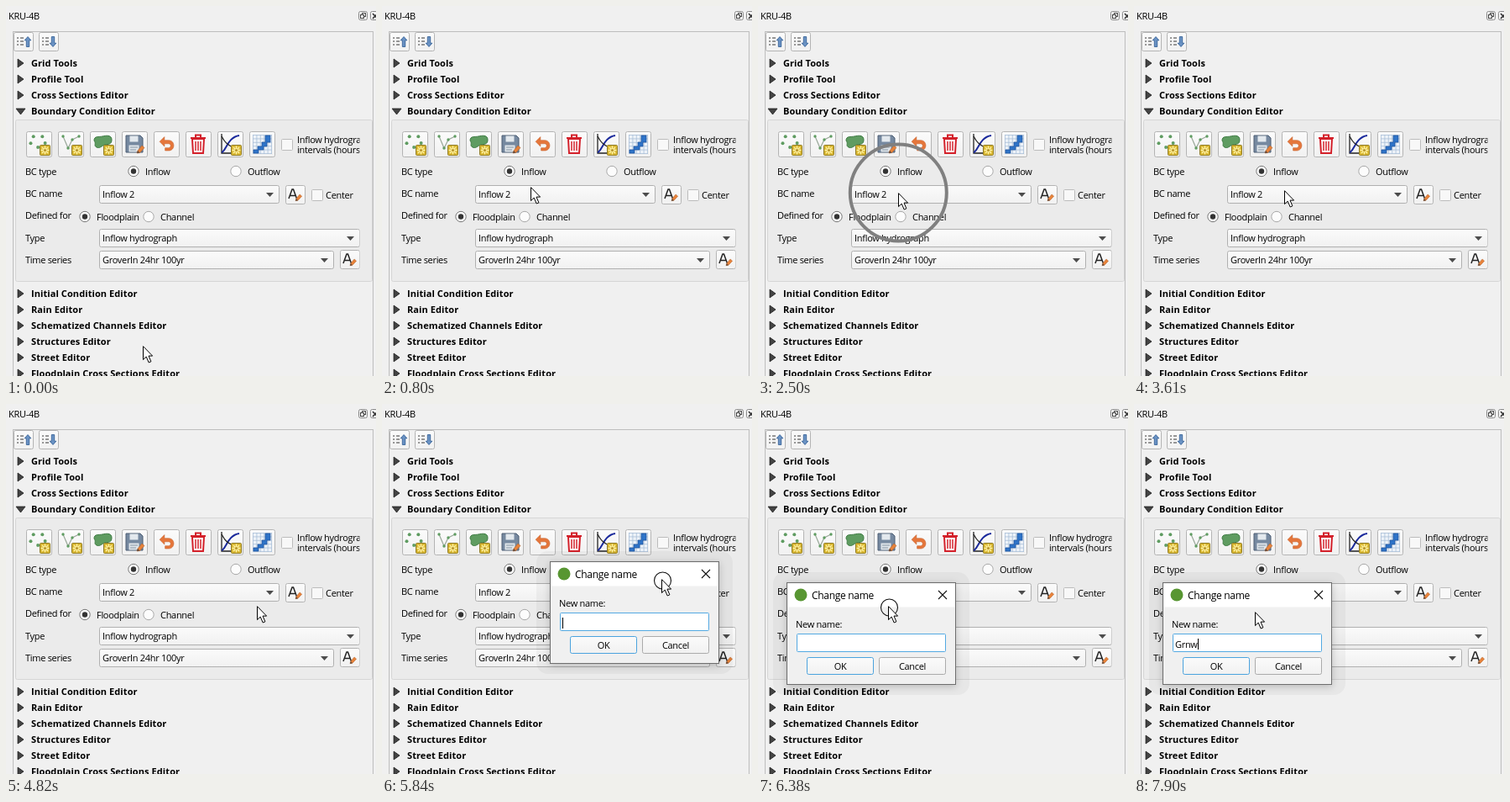
An HTML page for the animation above (8 s loop, 441 by 440 pixels).

```html
<!DOCTYPE html>
<html lang="en">
<head>
<meta charset="utf-8">
<title>Boundary condition editor</title>
<style>
html, body { margin: 0; width: 100%; height: 100%; overflow: hidden; background: #f0f0f0; }
svg { display: block; width: 100vw; height: 100vh; }
text { font: 11px "Open Sans", "Noto Sans", sans-serif; letter-spacing: -.3px; white-space: pre; }
.bold { font-weight: 700; letter-spacing: .08px; }
.title { font-size: 12px; }
.mid { text-anchor: middle; }
.frame { filter: drop-shadow(0 2px 4px rgba(0, 0, 0, .2)); }
</style>
</head>
<body>
<svg viewBox="0 0 441 440">
  <defs>
    <linearGradient id="face" x2="0" y2="1">
      <stop stop-color="#fbfbfb"/><stop offset="1" stop-color="#f1f1f1"/>
    </linearGradient>
    <clipPath id="view"><rect x="9" y="31" width="412.5" height="409"/></clipPath>
  </defs>
  <rect width="441" height="440" fill="#f0f0f0"/>
  <g id="panel"></g>
  <g id="form" clip-path="url(#view)"></g>
  <circle id="ring" cx="167.3" cy="222" fill="none" stroke="#808080" stroke-width="4"/>
  <g id="dialog"></g>
  <g id="pointer">
    <circle id="halo" cx="1.5" cy="2" r="10" fill="none" stroke="#111" stroke-width="1.1"/>
    <path d="M.5 .7V16.6L4.2 13.1 7.2 20 9.9 18.8 7 12.1H11.6Z" fill="#fff" stroke="#000"/>
  </g>
</svg>
<script>
const $ = id => document.getElementById(id);
const each = (n, draw) => Array.from({ length: n }, (_, i) => draw(i)).join('');

const text = (x, y, s, cls = '') => `<text x="${x}" y="${y}" class="${cls}">${s}</text>`;
const rect = (x, y, w, h, fill, stroke = 'none', r = 0) =>
  `<rect x="${x + .5}" y="${y + .5}" width="${w - 1}" height="${h - 1}" rx="${r}" fill="${fill}" stroke="${stroke}"/>`;
const path = (d, fill, stroke = 'none', w = 1) =>
  `<path d="${d}" fill="${fill}" stroke="${stroke}" stroke-width="${w}"/>`;
const line = (d, stroke, w = 1) => path(d, 'none', stroke, w);
const dot = (x, y, r, fill, stroke = 'none') =>
  `<circle cx="${x}" cy="${y}" r="${r}" fill="${fill}" stroke="${stroke}"/>`;
const group = (transform, body) => `<g transform="${transform}">${body}</g>`;
const at = (x, y, body) => group(`translate(${x} ${y})`, body);

// Form widgets, placed by the centre line of their row.
const label = (x, y, s) => text(x, y + 4, s);
const button = (x, y, w, h, body = '') => at(x, y, rect(0, 0, w, h, 'url(#face)', '#b4b4b4', 2) + body);
const checkbox = (x, y, s) => rect(x, y - 7, 14, 14, '#f8f8f8', '#bcbcbc', 1) + label(x + 17, y, s);
const radio = (x, y, s, on) => dot(x, y - .5, 6.2, '#fcfcfc', on ? '#777' : '#a8a8a8') +
  (on ? dot(x, y - .5, 3.2, '#333') : '') + label(x + 14, y, s);
const combo = (x, y, w, s) => rect(x, y - 11, w, 22, 'url(#face)', '#b0b0b0', 2) +
  path(`M${x + w - 16} ${y - 2}h9l-4.5 5z`, '#4c4c4c') + label(x + 4, y, s);
const pencil = (x, y) => at(x, y,
  path('M0 9L1 6 6 0 9 2.5 3.5 8.5Z', '#e8833a', '#b0602a', .6) + path('M0 9L1 6 3.5 8.5Z', '#5a4a40'));
const rename = (x, y) => button(x, y - 12, 24, 23,
  line('M4 16L8 5H9.5L13.5 16M6 12.5H11.500', '#222', 1.5) + group('translate(12 11) scale(.85)', pencil(0, 0)));

const section = (y, name, open) =>
  path(open ? `M12 ${y - 3}h11l-5.500 7z` : `M14 ${y - 5}v10l7 -5z`, '#444', '#111', .7) +
  label(30, y, name).replace('class=""', 'class="bold"');

const badge = rect(16, 16, 13, 13, '#d9b733', '#8f7a22', 1) + at(22.5, 22.5,
  each(4, i => group(`rotate(${45 * i})`, line('M0 -5V5', '#fff3a6', 1.4))) + dot(0, 0, 1.6, '#b8952a'));

function icons() {
  const green = '#5f9c61', red = '#d3202a';
  const nodes = [[6, 6], [12, 20], [17, 10], [25, 6]];
  const scatter = each(5, i => dot(14 + 9 * Math.cos(1.26 * i + .3), 12 + 7 * Math.sin(1.26 * i + .3), 2, green));
  const grid = each(6, i => line(`M${4.5 + 4.4 * i} 4V27M4 ${4.5 + 4.4 * i}H27`, '#a9bfd8', .8));
  return [
    scatter + badge,
    line('M' + nodes.join(' '), '#9aa89a', 1.2) + nodes.map(([x, y]) => dot(x, y, 1.7, green)).join('') + badge,
    path('M5 11C5 5 11 7 15 6S26 4 26 10 22 15 18 16 12 21 8 19 8 15 5 11Z', green, '#3d7a42') + badge,
    path('M5 5H22L25 8V25H5Z', '#7689a0', '#4c5d72') + rect(9, 5, 11, 8, '#e3e9ee') +
      rect(8, 16, 13, 9, '#dfe5ea') + line('M10 19H19M10 22H17', '#8595a3') + pencil(18, 17),
    group('translate(3 2.5) scale(.82)',
      path('M12 5L5 12 12 19V15H18C22 15 22 21 18 21H13V25H18C28 25 28 10 18 10H12Z', '#e5763b', '#c45d27', .7)),
    path('M8 9H22L21 26H9Z', '#fff', red, 2) + line('M6 8H24M12 7V4.500H18V7', red, 2) +
      each(3, i => line(`M${12 + 3 * i} 12V23`, red, 1.5)),
    line('M5 3V26H16', '#222', 1.3) + line('M5 25C10 24 12 7 26 5', '#1b2a9c', 2) +
      line('M5 6C9 14 14 18 20 19', '#222', 1.3) + badge,
    rect(4, 4, 23, 23, '#eef3f9') + grid +
      path('M19 5H25V13H21V18H17V22H11V26H5V22H10V18H15V13H19Z', '#2f74c8', '#1c4f9a', .7)
  ];
}

function drawPanel() {
  const arrow = dir => line('M4 7H6M4 11H6M4 15H6M8 7H12M8 11H12M8 15H12', '#777', 1.5) +
    group(`translate(17 11.5) scale(.85 ${.85 * dir})`, path('M0 -7L4.500 -2H2V7H-2V-2H-4.500Z', '#6b93c4', '#2d5c94'));
  const corner = x => rect(x, 6, 11, 11, '#f4f4f4', '#8a8a8a', 2);
  $('panel').innerHTML = text(3, 15.5, 'KRU-4B') +
    corner(420) + rect(424, 8, 5, 5, 'none', '#444') + rect(422, 10, 5, 5, '#f4f4f4', '#444') +
    corner(434) + line('M437 9L443 15M443 9L437 15', '#333', 1.6) +
    rect(8, 30, 430, 420, 'none', '#bdbdbd') + rect(11, 135, 426, 193, '#ebebeb', '#d6d6d6', 2) +
    button(9, 31, 24, 23, arrow(1)) + button(39, 31, 24, 23, arrow(-1));
}

function drawForm() {
  const above = ['Grid Tools', 'Profile Tool', 'Cross Sections Editor', 'Boundary Condition Editor'];
  const below = ['Initial Condition Editor', 'Rain Editor', 'Schematized Channels Editor',
    'Structures Editor', 'Street Editor', 'Floodplain Cross Sections Editor'];
  const labels = ['BC type', 'BC name', 'Defined for', 'Type', 'Time series'];
  const row = i => 197 + Math.round(26.2 * i);
  $('form').innerHTML =
    above.map((s, i) => section(68 + 19 * i, s, i === 3)).join('') +
    below.map((s, i) => section(342 + 19 * i, s)).join('') +
    icons().map((body, i) => button(24 + 38 * i, 149, 31, 31, body)).join('') +
    labels.map((s, i) => label(23, row(i), s)).join('') +
    checkbox(328, 165, '') + text(347, 163, 'Inflow hydrograph') + text(347, 175, 'intervals (hours)') +
    radio(152, row(0), 'Inflow', true) + radio(274, row(0), 'Outflow') +
    combo(111, row(1) + 1, 215, 'Inflow 2') + rename(333, row(1) + 2) + checkbox(364, row(1) + 2, 'Center') +
    radio(94, row(2) + 2, 'Floodplain', true) + radio(170, row(2) + 2, 'Channel') +
    combo(111, row(3), 311, 'Inflow hydrograph') +
    combo(111, row(4), 280, 'GroverIn 24hr 100yr') + rename(398, row(4));
}

function drawDialog() {
  const choice = (x, s, edge) => rect(x, 89, 80, 21, 'url(#face)', edge, 2) + text(x + 40, 104, s, 'mid');
  $('dialog').innerHTML =
    `<rect x="-16" y="-12" width="234" height="146" rx="14" opacity=".04"/>` +
    `<g class="frame">${rect(0, 0, 202, 122, '#f0f0f0', '#6e6e6e')}</g>` + rect(1, 1, 200, 29, '#fff') +
    dot(17, 15, 7.5, '#589632') + text(30, 20, 'Change name', 'title') +
    line('M181 10L191 20M191 10L181 20', '#111', 1.1) + text(11, 54, 'New name:') +
    rect(12, 61, 178, 22, '#fff', '#53a9e2', 1) + '<text id="typed" x="15" y="78"></text>' +
    '<rect id="caret" y="67" width="1" height="13"/>' +
    choice(24, 'OK', '#4ba3de') + choice(110, 'Cancel', '#ababab');
}

// Moves advance in visible steps: [start, step count, x, y].
const LOOP = 8000, STEP = 135, OPEN = 5840, DRAG = 5960, DROP = 6530;
const pointerMoves = [
  [130, 4, 170, 202], [800, 1, 177, 215], [1920, 1, 167, 222], [3610, 1, 179, 219], [3760, 1, 334, 212],
  [4060, 3, 343, 220], [4820, 1, 299, 240], [OPEN, 1, 333, 208], [DRAG, 3, 155, 240], [DROP, 1, 144, 247]
];
const dialogMoves = [[DRAG, 3, 34, 212]];
const keyTimes = [7330, 7610, 7760, 7900];

const ease = p => p < .5 ? (2 * p) ** 3.2 / 2 : 1 - (2 - 2 * p) ** 3.2 / 2;

function follow(moves, [x, y], t) {
  for (const [start, count, toX, toY] of moves) {
    if (t < start) break;
    const p = ease(Math.min(1, (Math.floor((t - start) / STEP) + 1) / count));
    x += (toX - x) * p;
    y += (toY - y) * p;
  }
  return [Math.round(x), Math.round(y)];
}

function ringRadius(t) {
  const [start, radius] = t < 2920 ? [2350, 97.5] : [2920, 77];
  return t < start ? 0 : radius - 40 * Math.floor((t - start) / STEP);
}

const show = (id, on) => $(id).setAttribute('visibility', on ? 'visible' : 'hidden');
const place = (id, [x, y]) => $(id).setAttribute('transform', `translate(${x} ${y})`);

function render(t) {
  const open = t >= OPEN;
  place('pointer', follow(pointerMoves, [163, 404], t));
  $('pointer').style.display = open || t < 4970 ? '' : 'none';
  show('halo', open && t < DROP);

  const r = ringRadius(t);
  show('ring', r > 20);
  $('ring').setAttribute('r', Math.max(0, r));

  place('dialog', follow(dialogMoves, [200, 187], t));
  $('dialog').style.display = open ? '' : 'none';
  $('typed').textContent = 'Grnw'.slice(0, keyTimes.filter(k => k <= t).length);
  const dragging = t >= DRAG && t < DROP;
  const blink = t >= keyTimes[0] || Math.floor((t - DROP) / 400) % 2 === 0;
  show('caret', blink && !dragging);
  if (open) $('caret').setAttribute('x', Math.round(15 + $('typed').getComputedTextLength()));
}

drawPanel();
drawForm();
drawDialog();
const start = performance.now();
function tick() {
  render((performance.now() - start) % LOOP);
  requestAnimationFrame(tick);
}
tick();
</script>
</body>
</html>
```
